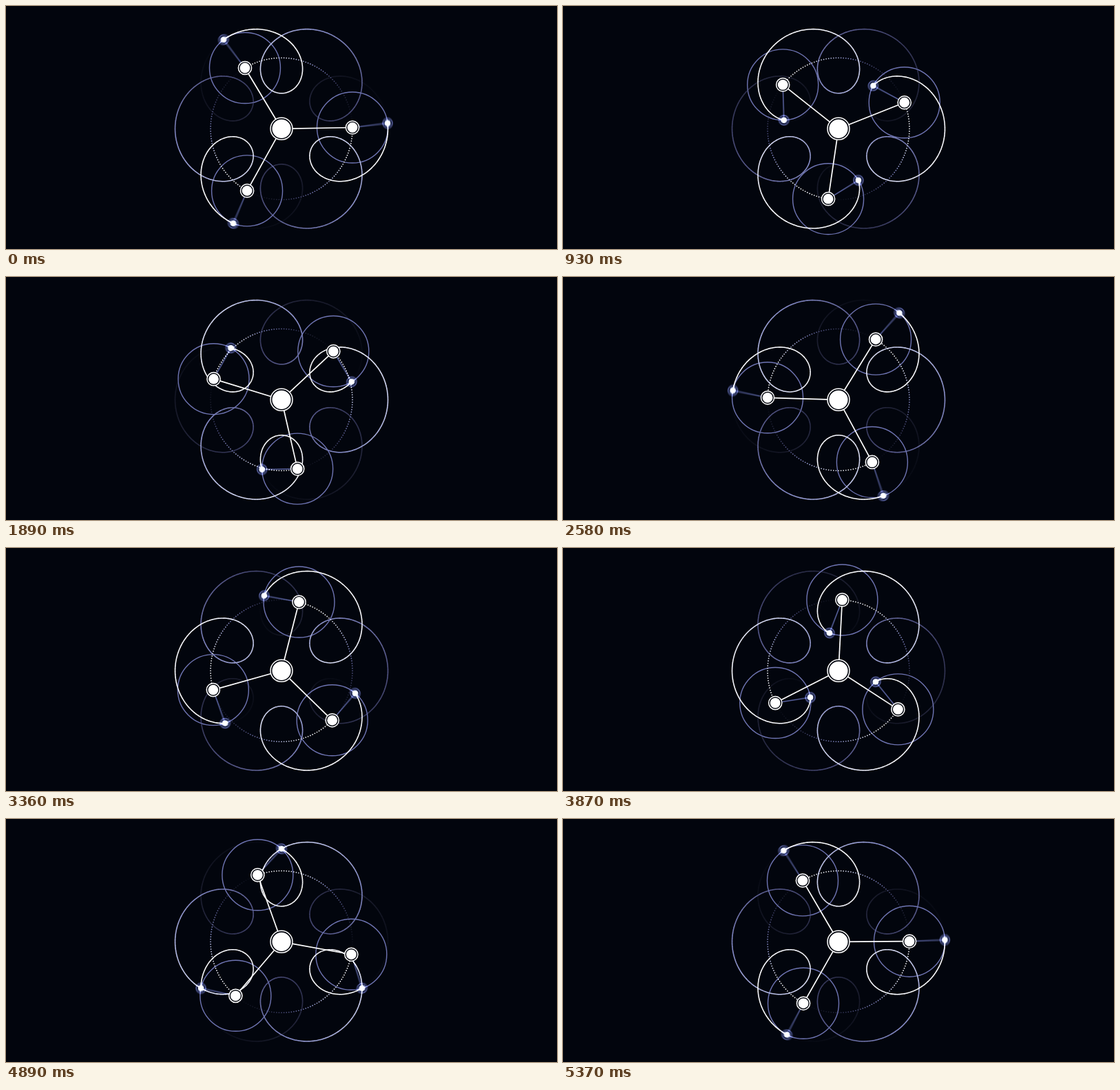
Recreate the animation shown at these times as an HTML page with a canvas. Size 800 by 353 pixels, loop 5.4 s.

```html
<!DOCTYPE html>
<html lang="en">
<head>
<meta charset="utf-8">
<title>Epicycles</title>
<style>
  html, body { margin: 0; width: 100%; height: 100%; overflow: hidden; background: #02050d; }
  canvas { display: block; width: 800px; height: 353px; }
</style>
</head>
<body>
<canvas id="stage" width="800" height="353"></canvas>
<script>
const ctx = document.getElementById('stage').getContext('2d');
const LOOP = 5400, STEP = 30, SPAN = 120;
const CX = 400, CY = 178.3, R = 103, r = 51.5, RATIO = 7;
const BG = [2, 5, 13];
const WHITE = '#fff', ORBIT = 'rgb(110,116,178)';

// Trail colour by degrees behind the head: [degrees, r, g, b]
const FADE = [
  [0, 255, 255, 255], [28, 250, 250, 255], [43, 200, 205, 238],
  [58, 134, 140, 200], [76, 80, 82, 130], [84, 56, 58, 94],
  [98, 28, 30, 48], [110, 10, 13, 24], [SPAN, ...BG]
];

function fade(d) {
  let i = 1;
  while (i < FADE.length - 1 && FADE[i][0] < d) i++;
  const a = FADE[i - 1], b = FADE[i];
  const k = (d - a[0]) / (b[0] - a[0]);
  const c = [1, 2, 3].map(n => Math.round(a[n] + (b[n] - a[n]) * k));
  return `rgb(${c})`;
}

function polar(x, y, radius, deg) {
  const a = deg * Math.PI / 180;
  return [x + radius * Math.cos(a), y - radius * Math.sin(a)];
}
const hub = deg => polar(CX, CY, R, deg);
const tip = deg => polar(...hub(deg), r, deg * RATIO);

function line(p, q, color, width) {
  ctx.strokeStyle = color;
  ctx.lineWidth = width;
  ctx.beginPath();
  ctx.moveTo(...p);
  ctx.lineTo(...q);
  ctx.stroke();
}

function ring(p, radius, color, width) {
  ctx.strokeStyle = color;
  ctx.lineWidth = width;
  ctx.beginPath();
  ctx.arc(...p, radius, 0, 2 * Math.PI);
  ctx.stroke();
}

function disc(p, radius, color) {
  ctx.fillStyle = color;
  ctx.beginPath();
  ctx.arc(...p, radius, 0, 2 * Math.PI);
  ctx.fill();
}

function joint(p, inner, outer) {
  disc(p, outer, `rgb(${BG})`);
  ring(p, outer, WHITE, 1.5);
  disc(p, inner, WHITE);
}

function trail(head) {
  const step = 0.5;
  for (let d = SPAN - step; d >= 0; d -= step)
    line(tip(head - d - step), tip(head - d + (d ? 0.05 : 0)), fade(d), 1.55);
}

function dots(head) {
  const gap = 2;
  for (let a = Math.floor(head / gap) * gap; a > head - SPAN; a -= gap)
    disc(hub(a), 0.85, fade(head - a));
}

// The fast outer arm is averaged over a short shutter
function satellite(head) {
  const n = 6, shutter = 0.45;
  ctx.globalCompositeOperation = 'lighter';
  ctx.globalAlpha = 1 / n;
  for (let i = 0; i < n; i++) {
    const a = head + ((i + 0.5) / n - 0.5) * shutter;
    const p = tip(a);
    line(hub(a), p, 'rgb(84,89,146)', 1.5);
    ring(p, 7, 'rgb(76,82,138)', 1.6);
    disc(p, 5.6, 'rgb(30,33,64)');
    disc(p, 4.1, WHITE);
  }
  ctx.globalAlpha = 1;
  ctx.globalCompositeOperation = 'source-over';
}

function draw(time) {
  const t = Math.floor((time % LOOP) / STEP) * STEP;
  const heads = [0, 1, 2].map(i => 1 + SPAN * (t / LOOP + i));
  ctx.fillStyle = `rgb(${BG})`;
  ctx.fillRect(0, 0, 800, 353);

  ctx.globalCompositeOperation = 'lighten';
  for (const h of heads) {
    dots(h);
    ring(hub(h), r, ORBIT, 1.4);
    trail(h);
  }
  ctx.globalCompositeOperation = 'source-over';

  for (const h of heads) {
    satellite(h);
    line([CX, CY], hub(h), WHITE, 1.7);
    joint(hub(h), 7.4, 9.6);
  }
  joint([CX, CY], 13.6, 16);
}

const start = performance.now();
function tick() {
  draw(performance.now() - start);
  requestAnimationFrame(tick);
}
tick();
</script>
</body>
</html>
```
